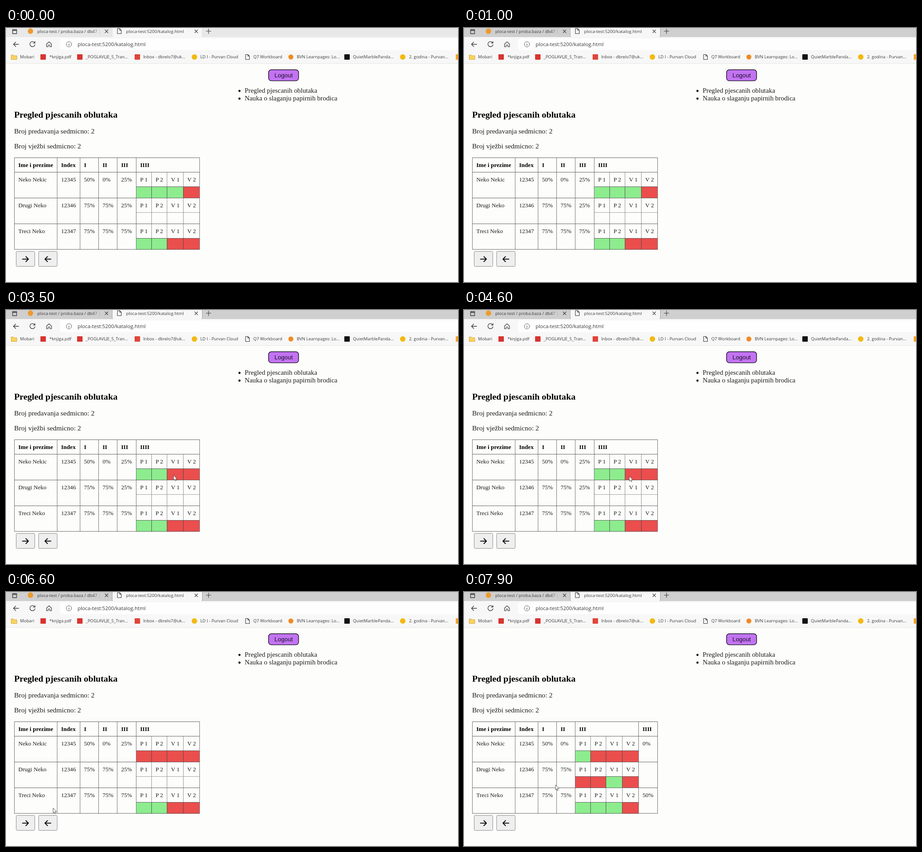
These frames come from a looping animation (998 px wide and 561 px high, 8 s). An HTML page:

```html
<!DOCTYPE html>
<html lang="bs">
<head>
<meta charset="utf-8">
<title>Prisustvo</title>
<style>
  html, body { margin: 0; width: 100%; height: 100%; overflow: hidden; background: #fdfdfc; }
  svg { display: block; width: 100vw; height: 100vh; --strip: #e8e8e8; --edge: #e0e0e0; }
  svg.focused { --strip: #cfcfcf; --edge: #a2a2a2; }
  text { white-space: pre; }
  .strip { fill: var(--strip); }
  .edge { stroke: var(--edge); }
  stop { stop-color: var(--strip); }
  .ui { font-family: "Open Sans", "Noto Sans", sans-serif; fill: #3c3c3c; }
  .page { font-family: "Liberation Serif", "Times New Roman", serif; fill: #1c1c1c; }
  .bold { font-weight: bold; fill: #000; }
  .btn { font-family: "Liberation Sans", Arial, sans-serif; fill: #1c1028; }
  .line { fill: none; stroke: #3a3a3a; stroke-linecap: round; stroke-linejoin: round; }
</style>
</head>
<body>
<svg id="stage" viewBox="0 0 998 561" preserveAspectRatio="none">
  <defs>
    <linearGradient id="fade">
      <stop offset="0" stop-opacity="0"/>
      <stop offset="1"/>
    </linearGradient>
  </defs>
  <rect width="998" height="561" fill="#fdfdfc"/>
  <g id="chrome"></g>
  <g id="content"></g>
  <g id="table"></g>
  <g id="buttons"></g>
  <path id="cursor" d="M0 0V11L2.5 8.8L4.2 12.6L6 11.8L4.3 8.1H7.6Z" fill="#fff" stroke="#444" stroke-width=".9" stroke-linejoin="round"/>
</svg>
<script>
const LOOP = 8000, STEP = 100;
const GREEN = '#8dec8e', RED = '#ea4e4d';
const el = id => document.getElementById(id);

const text = (x, y, s, size, cls, extra = '') =>
  `<text x="${x}" y="${y}" font-size="${size}" class="${cls}" ${extra}>${s}</text>`;
const rect = (x, y, w, h, fill, extra = '') =>
  `<rect x="${x}" y="${y}" width="${w}" height="${h}" fill="${fill}" ${extra}/>`;
const dot = (x, y, r, fill) => `<circle cx="${x}" cy="${y}" r="${r}" fill="${fill}"/>`;
const line = (d, w = 1.1, extra = '') => `<path class="line" d="${d}" stroke-width="${w}" ${extra}/>`;
const pageIcon = (x, y) =>
  line(`M${x - 4} ${y - 5.5}h5l3.5 3.5v7.5h-8.5zM${x + 1} ${y - 5.5}v3.5h3.5`);
const square = (x, fill) => rect(x - 6, 58, 12, 12, fill, 'rx="1"');

function drawChrome() {
  const site = 'ploca-test:5200/katalog.html';
  const closeX = x => line(`M${x - 3.3} 4l6.6 6.6m0 -6.6l-6.6 6.6`);
  const folder = '<path d="M11.5 59.5h4.5l1.5 1.7h6.5v8.3h-12.5z" fill="#fbd25c" stroke="#c99a2c" stroke-width=".8"/>';
  const marks = [
    [31, 'Mobari', folder],
    [96, '*knjiga.pdf', square(82, '#d8342f')],
    [176, '_POGLAVLJE_5_Tran...', square(163, '#d8342f')],
    [303, 'Inbox - dbrelo7@uk...', square(290, '#e0453a')],
    [429, 'LD I - Purvan Cloud', dot(416, 64, 6, '#f2b90f')],
    [546, 'Q7 Workboard', pageIcon(533, 64)],
    [642, 'BVN Learnpages: Lo...', dot(629, 64, 5.5, '#f08a24')],
    [766, 'QuietMarblePanda...', square(753, '#111')],
    [890, '2. godina - Purvan...', dot(876, 64, 6, '#f2b90f')],
  ];
  el('chrome').innerHTML =
    rect(0, 0, 998, 20, '', 'class="strip"') +
    rect(0, 20, 998, 58, '#f7f7f7') +
    rect(0, 78, 998, 1, '#e6e6e6') +
    rect(235, -8, 198, 29, '#f7f7f7', 'rx="5"') +
    '<path class="edge" d="M234.5 0V19M433.5 0V19"/>' +
    line('M14.5 3.5h9v9h-9zM14.5 5.5h9', 1.3) +
    dot(54, 7, 6, '#ee9a2e') +
    text(69, 10.5, 'ploca-test / proba.baza / db47 | adm', 9.5, 'ui') +
    rect(192, 0, 20, 19, 'url(#fade)') + rect(212, 0, 22, 19, '', 'class="strip"') +
    closeX(222) + pageIcon(250, 7) +
    text(265, 10.5, site, 9.6, 'ui') +
    closeX(420) + line('M442 7h10.5M447.2 2v10.5') +
    line('M28 36h-11.5m5 -5l-5 5l5 5', 1.3) +
    line('M63.5 33a5.7 5.7 0 1 0 .5 4M64 29.8v3.6h-3.8', 1.3) +
    line('M89.5 35.5l5.5 -5l5.5 5v6h-3.6v-4h-3.8v4h-3.6z', 1.2) +
    rect(119, 23, 900, 26, '#fefefe', 'rx="5"') +
    '<circle cx="139" cy="36" r="5.8" class="line" stroke-width="1" style="stroke:#666"/>' +
    line('M139 35.5v3.2M139 33.2v.1', 1.1) +
    text(158, 40, site, 11.3, 'ui') +
    marks.map(([x, s, icon]) => icon + text(x, 67.3, s, 9.4, 'ui')).join('') +
    rect(993, 58, 5, 12, '#f3a32c');
}

function drawContent() {
  const course = 'Pregled pjescanih oblutaka';
  el('content').innerHTML =
    rect(579.7, 92.2, 66.3, 24.4, '#c273f1', 'rx="6" stroke="#1a1022" stroke-width="1.4"') +
    text(613, 109, 'Logout', 13.2, 'btn', 'text-anchor="middle"') +
    dot(515.5, 139, 2.4, '#111') + text(527, 143, course, 14.87, 'page') +
    dot(515.5, 156, 2.4, '#111') + text(527, 160, 'Nauka o slaganju papirnih brodica', 14.87, 'page') +
    text(18, 198, course, 19.7, 'page bold') +
    text(18, 233, 'Broj predavanja sedmicno: 2', 15.4, 'page') +
    text(18, 266, 'Broj vježbi sedmicno: 2', 15.4, 'page');
}

// Attendance per open week: g = present, r = absent, - = not entered
const NAMES = ['Neko Nekic', 'Drugi Neko', 'Treci Neko'];
const WEEKS = [['50%', '75%', '75%'], ['0%', '75%', '75%'], ['25%', '25%', '75%'], ['0%', '', '50%']];
const SLOTS = ['P 1', 'P 2', 'V 1', 'V 2'];
const SLOT_X = [0, 34, 68, 104, 140];

function drawTable(open, marks) {
  const cols = [18.5, 113, 163.5, 204.5, 245.5, open === 3 ? 287.5 : 385.5, 427.5];
  const heads = ['Ime i prezime', 'Index', 'I', 'II', 'III', 'IIII'];
  const left = cols[open + 2];
  const rule = (d, c = '#666', w = .9) => `<path d="${d}" stroke="${c}" stroke-width="${w}" fill="none"/>`;
  let s = heads.map((h, i) => text(cols[i] + 8.7, 306.5, h, 13.1, 'page bold')).join('');
  NAMES.forEach((name, r) => {
    const top = 318.5 + 57 * r, base = top + 20.5;
    const cell = (i, v) => text(cols[i] + 8.7, base, v, 13.1, 'page');
    s += cell(0, name) + cell(1, 12345 + r);
    WEEKS.forEach((w, i) => { if (i !== open) s += cell(i + 2, w[r]); });
    SLOTS.forEach((slot, i) => {
      const x = left + SLOT_X[i], m = marks[r][i];
      s += text(x + 8.7, base, slot, 13.1, 'page');
      if (m !== '-') s += rect(x, top + 32, SLOT_X[i + 1] - SLOT_X[i], 25, m === 'g' ? GREEN : RED);
      if (i) {
        s += rule(`M${x} ${top}v32`, '#85858f');
        s += rule(`M${x} ${top + 32}v25`, m === '-' ? '#85858f' : '#444');
      }
    });
    s += rule(`M${left} ${top + 32}h140`, marks[r][0] === '-' ? '#999' : '#555');
  });
  s += cols.map(x => rule(`M${x} 286.5V489`)).join('');
  s += [286.5, 318.5, 375.5, 432.5, 489].map(y => rule(`M18.5 ${y}H427.5`, '#555')).join('');
  el('table').innerHTML = s;
}

function drawButtons(hover) {
  const button = (x, fill, dir) =>
    rect(x, 493.5, 41, 33, fill, 'rx="2" stroke="#8a8a8a" stroke-width="1"') +
    line(`M${x + 20.5 - 6.5 * dir} 510.5h${13 * dir}m${-5.5 * dir} -5.5l${5.5 * dir} 5.5l${-5.5 * dir} 5.5`, 2, 'style="stroke:#111"');
  el('buttons').innerHTML = button(22.5, '#efefef', 1) + button(72, hover ? '#e4e4e4' : '#efefef', -1);
}

// Pointer path: time, x, y
const PATH = [
  [1600, 990, 380], [1800, 760, 330], [2000, 480, 280], [2100, 400, 266], [2300, 382, 318],
  [2600, 371, 361], [2800, 370, 365], [3700, 370, 365], [4200, 367, 368], [4600, 365, 367],
  [4900, 341, 363], [5400, 336, 361], [5500, 334, 360], [5700, 305, 360], [6100, 300, 362],
  [6300, 235, 405], [6600, 104, 477], [6800, 91, 506], [7600, 92, 507], [7700, 98, 503],
  [7800, 135, 474], [7900, 202, 426],
];

function pointer(t) {
  if (t < PATH[0][0]) return null;
  const i = PATH.findIndex(p => p[0] > t);
  if (i < 0) return PATH[PATH.length - 1].slice(1);
  const [t0, x0, y0] = PATH[i - 1], [t1, x1, y1] = PATH[i];
  const k = (t - t0) / (t1 - t0);
  return [x0 + (x1 - x0) * k, y0 + (y1 - y0) * k];
}

const FOCUS = 1000;
const CLICKS = { P1: 5900, P2: 5100, V1: 3300, back: 7200 };
let shown = '', hovered = null;

function render(ms) {
  const t = Math.floor(ms / STEP) * STEP;
  el('stage').classList.toggle('focused', t >= FOCUS);

  const mark = k => t >= CLICKS[k] ? 'r' : 'g';
  const open = t >= CLICKS.back ? 2 : 3;
  const marks = open === 2
    ? ['grrr', 'rrgr', 'gggr']
    : [mark('P1') + mark('P2') + mark('V1') + 'r', '----', 'ggrr'];
  const key = open + marks.join();
  if (key !== shown) { drawTable(open, marks); shown = key; }

  const p = pointer(t), cursor = el('cursor');
  cursor.setAttribute('visibility', p ? 'visible' : 'hidden');
  if (p) cursor.setAttribute('transform', `translate(${p[0]} ${p[1]})`);

  const over = !!p && p[0] > 72 && p[0] < 113 && p[1] > 493 && p[1] < 527;
  if (over !== hovered) { drawButtons(over); hovered = over; }
}

drawChrome();
drawContent();
render(0);
const start = performance.now();
(function tick() {
  render((performance.now() - start) % LOOP);
  requestAnimationFrame(tick);
})();
</script>
</body>
</html>
```
